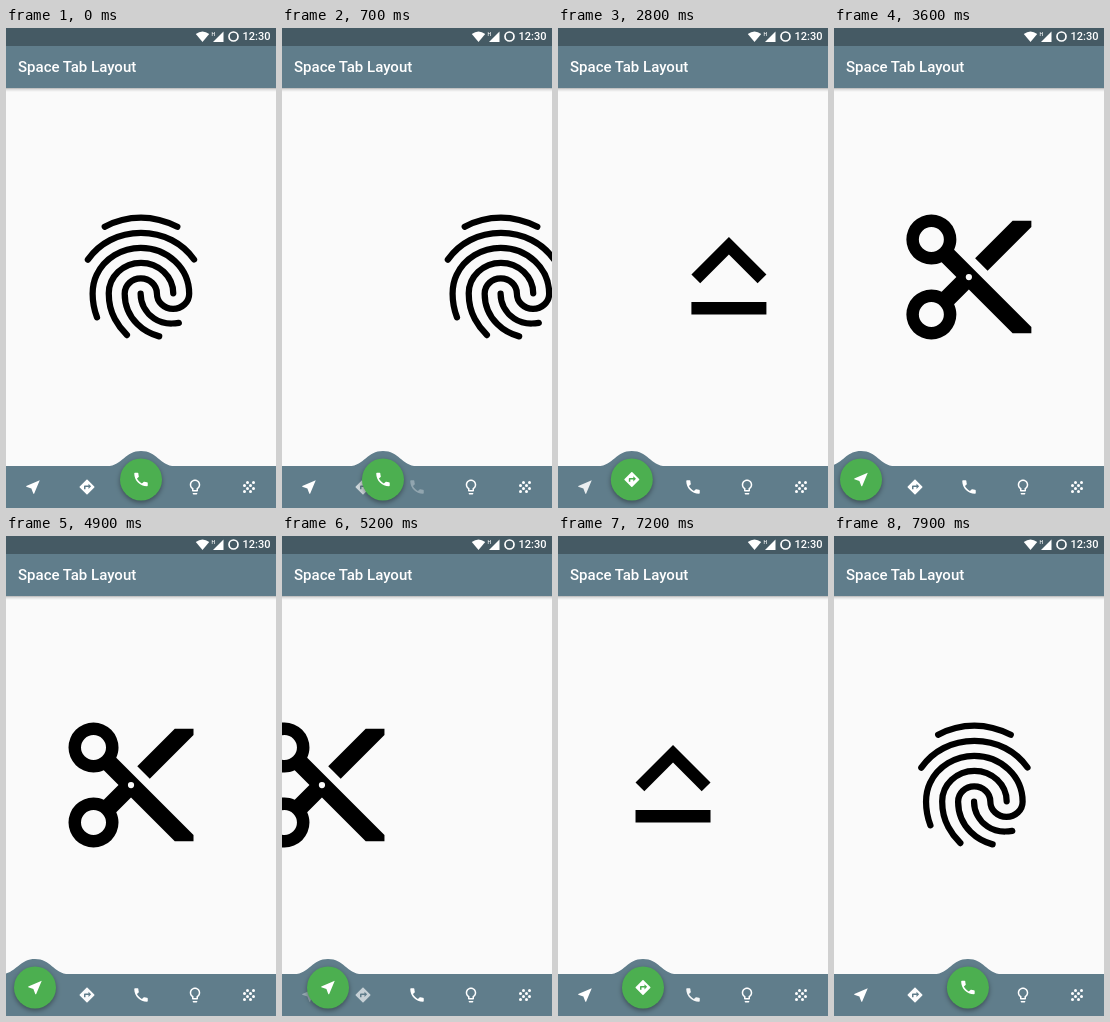
An HTML page with a canvas that plays this animation: 270x480 px, repeating every 8 s.

```html
<!DOCTYPE html>
<html lang="en">
<head>
<meta charset="utf-8">
<title>Space Tab Layout</title>
<style>
  html, body { margin: 0; width: 100%; height: 100%; overflow: hidden; background: #fafafa; }
  canvas { position: absolute; left: 0; top: 0; width: 270px; height: 480px; }
  span { position: absolute; color: #fff; font-family: Roboto, sans-serif; font-weight: 500; white-space: nowrap; }
  #title { left: 12px; top: 29px; font-size: 15px; line-height: 20px; }
  #clock { right: calc(100% - 264.5px); top: 2px; font-size: 11px; line-height: 14px; }
  #net { left: 205.5px; top: 3px; font-size: 5px; line-height: 6px; }
</style>
</head>
<body>
<canvas id="stage"></canvas>
<span id="title">Space Tab Layout</span>
<span id="clock">12:30</span>
<span id="net">H</span>
<script>
const W = 270, H = 480, LOOP = 8000, STEP = 100;
const BAR = '#607d8b', DARK = '#455a64', GREEN = '#4caf50', PAPER = '#fafafa';
const canvas = document.getElementById('stage');
const ctx = canvas.getContext('2d');
const ratio = window.devicePixelRatio || 1;
canvas.width = W * ratio;
canvas.height = H * ratio;

// Icons live on a 24-unit grid.
const dots = [[10, 6], [18, 6], [6, 10], [14, 10], [10, 14], [18, 14], [6, 18], [14, 18]]
  .map(([x, y]) => `M${x - 2} ${y}a2 2 0 1 0 4 0a2 2 0 1 0-4 0z`).join('');

const tabIcons = [
  'M21 3L3 10.53v.98l6.84 2.65L12.48 21h.98L21 3z',
  'M21.71 11.29l-9-9c-.39-.39-1.02-.39-1.41 0l-9 9c-.39.39-.39 1.02 0 1.41l9 9c.39.39 1.02.39 1.41 0l9-9c.39-.38.39-1.01 0-1.41z' +
    'M14 14.5V12h-4v3H8v-4c0-.55.45-1 1-1h5V7.5l3.5 3.5-3.5 3.5z',
  'M6.62 10.79c1.44 2.83 3.76 5.14 6.59 6.59l2.2-2.2c.27-.27.67-.36 1.02-.24 1.12.37 2.33.57 3.57.57.55 0 1 .45 1 1V20c0 .55-.45 1-1 1' +
    '-9.39 0-17-7.61-17-17 0-.55.45-1 1-1h3.5c.55 0 1 .45 1 1 0 1.25.2 2.45.57 3.57.11.35.03.74-.25 1.02l-2.2 2.2z',
  'M9 21c0 .55.45 1 1 1h4c.55 0 1-.45 1-1v-1H9v1z' +
    'M12 2C8.14 2 5 5.14 5 9c0 2.38 1.19 4.47 3 5.74V17c0 .55.45 1 1 1h6c.55 0 1-.45 1-1v-2.26c1.81-1.27 3-3.36 3-5.74 0-3.86-3.14-7-7-7z' +
    'M14.85 13.1l-.85.6V16h-4v-2.3l-.85-.6C7.8 12.16 7 10.63 7 9c0-2.76 2.24-5 5-5s5 2.24 5 5c0 1.63-.8 3.16-2.15 4.1z',
  dots
].map(d => new Path2D(d));

const scissors = new Path2D(
  'M9.64 7.64c.23-.5.36-1.05.36-1.64a4 4 0 1 0-4 4c.59 0 1.14-.13 1.64-.36L10 12l-2.36 2.36C7.14 14.13 6.59 14 6 14' +
  'a4 4 0 1 0 4 4c0-.59-.13-1.14-.36-1.64L12 14l7 7h3v-1z' +
  'M4 6a2 2 0 1 0 4 0a2 2 0 1 0-4 0zM4 18a2 2 0 1 0 4 0a2 2 0 1 0-4 0z' +
  'M11.5 12a.5.5 0 1 0 1 0a.5.5 0 1 0-1 0zM19 3l-6 6 2 2 7-7V3z');
const capsLock = new Path2D('M12 8.41L16.59 13 18 11.59l-6-6-6 6L7.41 13zM6 18h12v-2H6z');
const fingerprint = new Path2D(
  'M6.2 3.97C7.96 3 9.97 2.5 12 2.5C14.1 2.5 15.8 2.95 17.81 3.97' +
  'M3.5 9.22C4.45 7.88 5.64 6.83 7.07 6.1C10.08 4.56 13.9 4.55 16.92 6.1C18.35 6.83 19.54 7.87 20.49 9.2' +
  'M9.75 21.29C8.95 20.48 8.45 19.9 7.82 18.71C7.17 17.55 6.84 16.15 6.84 14.61C6.84 11.92 9.17 9.72 12 9.72S17.16 11.92 17.16 14.61' +
  'M11.94 14.66C11.94 16.23 12.74 17.72 14.1 18.64C14.89 19.18 15.83 19.45 16.92 19.44C17.2 19.44 17.6 19.41 18.05 19.33' +
  'M14.91 21.5C13.4 21.09 12.43 20.53 11.41 19.52C10.11 18.22 9.39 16.5 9.39 14.66C9.39 13.32 10.54 12.22 11.97 12.22' +
  'S14.55 13.32 14.55 14.66S15.7 17.1 17.13 17.1S19.71 16 19.71 14.66C19.71 10.61 16.24 7.33 11.96 7.33' +
  'C8.92 7.33 6.16 9.03 4.9 11.65C4.48 12.53 4.26 13.55 4.26 14.67C4.26 15.74 4.45 17.1 4.96 18.45');

const pages = [
  () => ctx.fill(scissors, 'evenodd'),
  () => ctx.fill(capsLock),
  () => { ctx.lineWidth = 1; ctx.lineCap = ctx.lineJoin = 'round'; ctx.stroke(fingerprint); }
];

// Each swipe drags at a steady speed, then flings to rest after release.
const swipes = [
  { start: 500, release: 990, from: 2, to: 1, first: 0.101, lead: 2.67 },
  { start: 2800, release: 3150, from: 1, to: 0, first: 0.133, lead: 1 },
  { start: 4900, release: 5360, from: 0, to: 1, first: 0.037, lead: 1 },
  { start: 7200, release: 7617, from: 1, to: 2, first: 0.074, lead: 1 }
];
const DRAG_SPEED = 0.00105, FLING = 600;

function progress(s, t) {
  const drag = s.first + DRAG_SPEED * (Math.min(t, s.release) - s.start);
  const u = Math.min(1, Math.max(0, (t - s.release) / FLING));
  return 1 - (1 - drag) * (1 - u) ** 5;
}

function stateAt(t) {
  const s = swipes.filter(w => w.start <= t).pop();
  if (!s) return { page: 2, button: 2, selected: 2 };
  const p = progress(s, t);
  const mix = k => s.from + (s.to - s.from) * k;
  return {
    page: mix(p),
    button: mix(1 - (1 - p) ** s.lead),
    selected: t < s.release ? s.from : s.to
  };
}

const tabX = i => 27 + 54 * i;

function onGrid(x, y, size, draw) {
  ctx.save();
  ctx.translate(x - size / 2, y - size / 2);
  ctx.scale(size / 24, size / 24);
  draw();
  ctx.restore();
}

function tabIcon(i, x, y, alpha) {
  ctx.globalAlpha = alpha;
  ctx.fillStyle = '#fff';
  onGrid(x, y, 18, () => ctx.fill(tabIcons[i], 'evenodd'));
  ctx.globalAlpha = 1;
}

function rect(color, y, h) {
  ctx.fillStyle = color;
  ctx.fillRect(0, y, W, h);
}

function topBars() {
  const shade = ctx.createLinearGradient(0, 60, 0, 64);
  shade.addColorStop(0, 'rgba(0,0,0,.28)');
  shade.addColorStop(0.4, 'rgba(0,0,0,.1)');
  shade.addColorStop(1, 'rgba(0,0,0,0)');
  rect(shade, 60, 4);
  rect(BAR, 18, 42);
  rect(DARK, 0, 18);
  ctx.fillStyle = ctx.strokeStyle = '#fff';
  ctx.fill(new Path2D('M196.5 14L189.8 6Q196.5 1 203.2 6Z'));
  ctx.fill(new Path2D('M207 14L217.5 3.5V14Z'));
  ctx.lineWidth = 1.7;
  ctx.beginPath();
  ctx.arc(227.5, 8.5, 4.5, 0, Math.PI * 2);
  ctx.stroke();
}

function bottomBar({ page, button, selected }) {
  const x = tabX(button);
  rect(BAR, 438, 42);
  ctx.save();
  ctx.translate(x, 0);
  ctx.fill(new Path2D('M-34 438.5C-18 437 -16 423 0 423S18 437 34 438.5Z'));
  ctx.restore();

  tabIcons.forEach((_, i) => tabIcon(i, tabX(i), 459, Math.min(1, Math.abs(i - page))));

  ctx.save();
  ctx.shadowColor = 'rgba(0,0,0,.38)';
  ctx.shadowBlur = 5 * ratio;
  ctx.shadowOffsetY = 2 * ratio;
  ctx.fillStyle = GREEN;
  ctx.beginPath();
  ctx.arc(x, 451.5, 21, 0, Math.PI * 2);
  ctx.fill();
  ctx.restore();
  tabIcon(selected, x, 451.5, 1);
}

function render(t) {
  const state = stateAt(t);
  ctx.setTransform(ratio, 0, 0, ratio, 0, 0);
  rect(PAPER, 0, H);
  ctx.fillStyle = ctx.strokeStyle = '#000';
  pages.forEach((draw, i) => onGrid(W / 2 + (i - state.page) * W, 249, 150, draw));
  topBars();
  bottomBar(state);
}

const origin = performance.now();
function tick() {
  const t = (performance.now() - origin) % LOOP;
  render(Math.floor(t / STEP) * STEP);
  requestAnimationFrame(tick);
}
tick();
</script>
</body>
</html>
```
